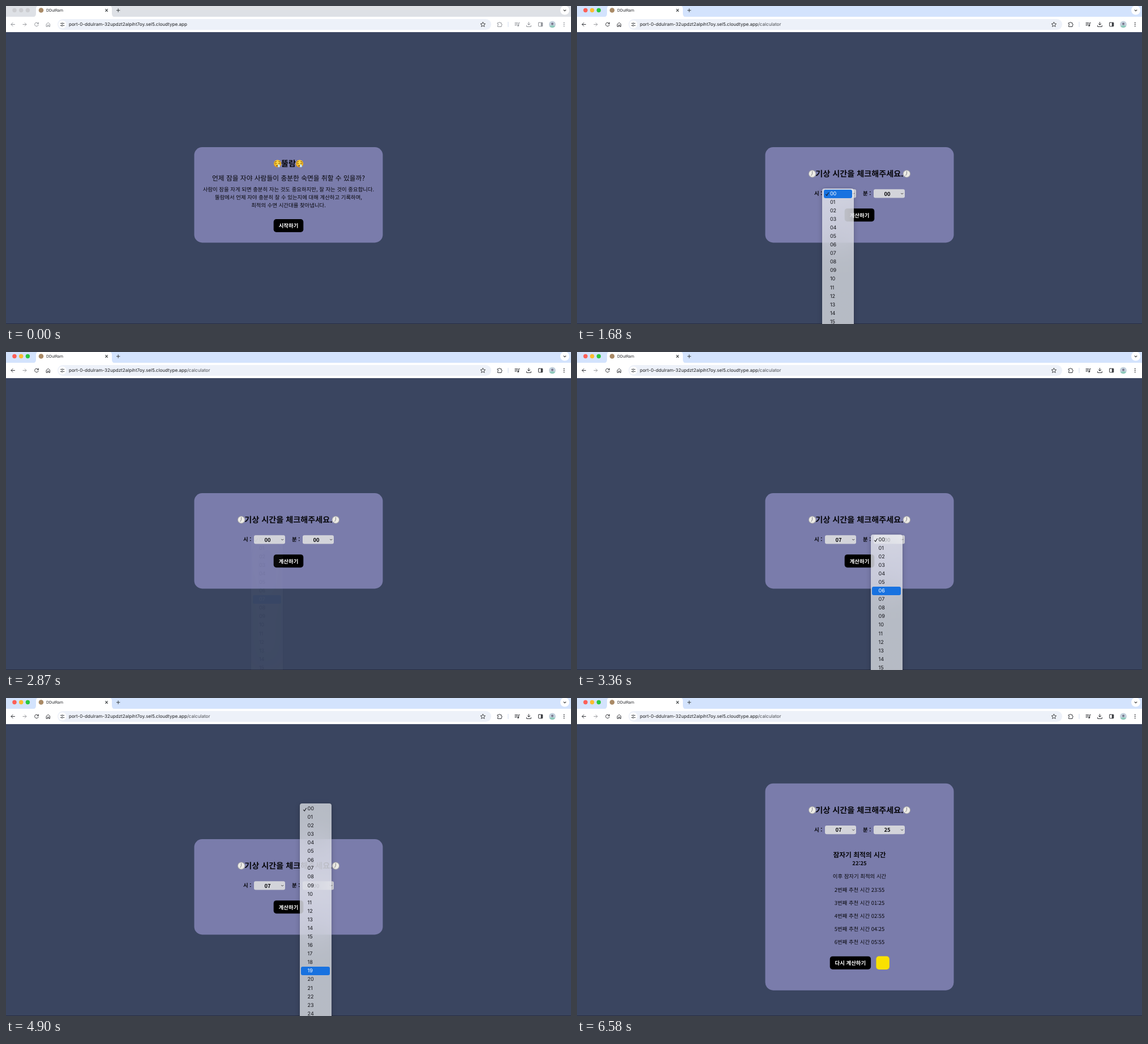
These frames come from a looping animation (998x561 px, 8 s). An HTML page:

```html
<!DOCTYPE html>
<html lang="ko">
<head>
<meta charset="utf-8">
<title>DDulRam</title>
<style>
  html, body { margin: 0; width: 100%; height: 100%; overflow: hidden; background: #3a4560; }
  #stage { position: relative; width: 998px; height: 561px; overflow: hidden; }
  svg { position: absolute; left: 0; top: 0; }
  text {
    font-family: "Noto Sans CJK KR", "Noto Sans KR", "Noto Sans CJK JP", "Noto Sans", sans-serif;
    font-weight: 500; white-space: pre; text-rendering: geometricPrecision;
  }
  text.ui { font-family: Inter, Roboto, sans-serif; font-weight: 400; }
  text.b { font-weight: 700; }
  .ink { stroke: var(--ink); fill: none; stroke-width: 1; stroke-linecap: round; stroke-linejoin: round; }
  .ink .solid { fill: var(--ink); stroke: none; }
  .menu {
    position: absolute; width: 56px; padding: 2.5px 0; box-sizing: border-box; border-radius: 4px;
    background: rgba(248, 249, 249, .66);
    -webkit-backdrop-filter: blur(26px); backdrop-filter: blur(26px);
    box-shadow: 0 2px 8px rgba(0, 0, 0, .22), 0 0 1px rgba(0, 0, 0, .4);
    font: 9.1px Inter, Roboto, sans-serif; color: #16171c; text-rendering: geometricPrecision;
  }
  .menu div { height: 15.05px; line-height: 15.05px; margin: 0 2.8px; padding-left: 11.2px; border-radius: 3px; }
  .menu div.on { background: #1872e0; color: #fff; }
  .menu svg { left: 5px; top: 5.6px; }
</style>
</head>
<body>
<div id="stage">
  <svg width="998" height="561" viewBox="0 0 998 561">
    <defs>
      <radialGradient id="skin" cx=".5" cy=".4" r=".6">
        <stop offset="0" stop-color="#ffe04a"/><stop offset=".65" stop-color="#f9c02c"/><stop offset="1" stop-color="#d98c18"/>
      </radialGradient>
      <g id="sleepy">
        <circle r="6.6" fill="url(#skin)"/>
        <g fill="none" stroke="#5e3a0c" stroke-width=".9" stroke-linecap="round">
          <path d="M-4.700 -.3q1.500 1.500 3.100 .2M1.600 -.1q1.500 1.300 3.100 -.2M-4.500 -2.700l2.300-.9M4.500 -2.700l-2.300-.9"/>
        </g>
        <ellipse cx="-.8" cy="3.700" rx="1.500" ry="1" fill="#6b4410"/>
        <path d="M2.200 .8c1.600 1.900 2.200 2.700 2.200 3.600a2.100 2.100 0 0 1-4.200 0c0-.9.8-2 2-3.600z" fill="#bfe2f7"/>
      </g>
      <g id="clock">
        <circle r="6.700" fill="#a4a4a8"/><circle r="5.700" fill="#ecebe6"/>
        <path d="M0-4.200V0L-1.800 3" fill="none" stroke="#6c6c70" stroke-width=".8" stroke-linecap="round"/>
      </g>
      <g id="dots"><circle cx="15" cy="7.500" r="3.700"/><circle cx="26.700" cy="7.500" r="3.700"/><circle cx="38.400" cy="7.500" r="3.700"/></g>
    </defs>

    <rect width="998" height="20" fill="var(--strip)"/>
    <path d="M47 19.500q6 0 6-6V5q0-5.500 5.500-5.500h123q5.500 0 5.500 5.500v8.500q0 6 6 6z" fill="#fff"/>
    <rect y="19" width="998" height="27.300" fill="#fff"/>
    <use href="#dots" fill="#cccdd1"/>
    <g id="lights">
      <circle cx="15" cy="7.500" r="3.700" fill="#fe5f57"/><circle cx="26.700" cy="7.500" r="3.700" fill="#febc2e"/><circle cx="38.400" cy="7.500" r="3.700" fill="#28c840"/>
    </g>
    <circle cx="62" cy="7.500" r="4.300" fill="#a98a66"/>
    <g stroke="#3c4043" fill="none" stroke-linecap="round">
      <path d="M175.700 5.700l3.800 3.800m0-3.800l-3.800 3.800" stroke-width="1.100"/>
      <path d="M198.200 4.900v5.600m-2.800-2.800h5.600"/>
    </g>
    <circle cx="987" cy="7.500" r="8" fill="#fff"/>
    <path d="M984.800 6.600l2.200 2.200 2.200-2.200" fill="none" stroke="#333" stroke-width="1.100"/>
    <rect x="91" y="23" width="766" height="19" rx="9.500" fill="#edf1f9"/>
    <circle cx="99.500" cy="32.500" r="7" fill="#fff"/>
    <g fill="none" stroke="#3c4043" stroke-width=".9">
      <path d="M96 30.700h2.400M100.800 34.500h2.600M96 34.500h2M101 30.700h2.200"/>
      <circle cx="99.500" cy="30.700" r="1.100" fill="#fff"/><circle cx="99.200" cy="34.500" r="1.100" fill="#fff"/>
    </g>
    <path d="M842.400 28.300l1.300 2.800 3 .3-2.300 2 .7 3-2.700-1.600-2.700 1.600.7-3-2.300-2 3-.3z" fill="none" stroke="#333" stroke-width=".9"/>
    <path d="M29.500 32.500h6.500m-3-3l3 3-3 3" fill="none" stroke="#9b9da1" stroke-width="1"/>
    <g class="ink">
      <path d="M15.500 32.500H9m3-3l-3 3 3 3"/>
      <path d="M57 31a3.300 3.300 0 1 0 .2 2.400M57.300 29v2.300H55"/>
      <path d="M71.500 31.800l3-2.500 3 2.500v4.500h-2v-2.600h-2v2.600h-2z"/>
      <path d="M868.500 29.800h2a1.200 1.200 0 0 1 2.400 0h2.100v2a1.200 1.200 0 0 1 0 2.400v2.300h-6.500v-2.300a1.200 1.200 0 0 0 0-2.400z"/>
      <path d="M899 29.700h5M899 31.900h5M899 34.100h2.800M905.700 34.500v-4.800h1.600"/>
      <circle class="solid" cx="904.600" cy="34.700" r="1.400"/>
      <path d="M923.500 28.500v5m-2.200-2.200l2.200 2.200 2.200-2.200M919.700 34.300v2.200h7.600v-2.200"/>
      <rect x="940.500" y="29.200" width="7.300" height="6.700" rx=".8"/>
      <rect class="solid" x="944.800" y="29.200" width="3" height="6.700"/>
      <circle class="solid" cx="985.700" cy="29.400" r=".9"/><circle class="solid" cx="985.700" cy="32.500" r=".9"/><circle class="solid" cx="985.700" cy="35.600" r=".9"/>
    </g>
    <path d="M887 28v9" stroke="#d0dbee"/>
    <circle cx="965" cy="32.500" r="5.900" fill="#c3d0dc"/>
    <path d="M960 35.500q5-3 10 0a5.900 5.900 0 0 1-10 0z" fill="#8fcabb"/>
    <circle cx="965" cy="31.500" r="2" fill="#77748a"/>
    <g id="bar"></g>

    <rect y="46.300" width="998" height="515" fill="#3a4560"/>
    <rect y="560" width="998" height="1" fill="#282e42"/>
    <rect id="card" x="332.500" width="333" rx="14.100" fill="#7a7cab"/>
    <g id="intro"></g>
    <g id="form"></g>
    <g id="ask"></g>
    <g id="result"></g>
  </svg>
</div>
<script>
const $ = id => document.getElementById(id);
const MID = 499, ROW = 15.05, S = 9.42, M = 11.78, L = 14.13;

// y is the visual middle of the line
const text = (x, y, size, str, { cls = '', fill = '#07070b', anchor = 'middle', id = '' } = {}) =>
  `<text x="${x}" y="${y + size * .37}" font-size="${size}" class="${cls}" fill="${fill}" text-anchor="${anchor}" id="${id}">${str}</text>`;
const bold = (x, y, size, str, opt) => text(x, y, size, str, { cls: 'b', ...opt });
const use = (name, x, y) => `<use href="#${name}" x="${x}" y="${y}"/>`;
const button = (x, y, w, label) =>
  `<rect class="btn" x="${x}" y="${y}" width="${w}" height="23" rx="4.700"/>` + bold(x + w / 2, y + 11.9, S, label, { fill: '#fff' });
const select = (x, id) =>
  `<rect x="${x}" y="323.200" width="55" height="15.300" rx="3" fill="#d3d4da"/>` +
  bold(x + 24, 331.2, S, '00', { id }) +
  `<path d="M${x + 48.2} 330l2 2 2-2" fill="none" stroke="#333" stroke-width=".9"/>`;

$('bar').innerHTML =
  text(71, 7.6, 6.9, 'DDulRam', { cls: 'ui', anchor: 'start', fill: '#24262a' }) +
  text(111, 32.4, 8.1, 'port-0-ddulram-32updzt2alpiht7oy.sel5.cloudtype.app<tspan id="path" fill="#484b50">/calculator</tspan>',
    { cls: 'ui', anchor: 'start', fill: '#1f2023' });

$('intro').innerHTML =
  use('sleepy', 479.6, 278) + use('sleepy', 518.6, 278) + bold(MID, 277.5, L, '뚤람') +
  text(MID, 303.5, M, '언제 잠을 자야 사람들이 충분한 숙면을 취할 수 있을까?') +
  ['사람이 잠을 자게 되면 충분히 자는 것도 중요하지만, 잘 자는 것이 중요합니다.',
   '뚤람에서 언제 자야 충분히 잘 수 있는지에 대해 계산하고 기록하며,',
   '최적의 수면 시간대를 찾아냅니다.'].map((s, i) => text(MID, 323.5 + i * 13.9, S, s)).join('') +
  button(472.7, 376, 52.6, '시작하기');

$('form').innerHTML =
  use('clock', 415.6, 296) + use('clock', 582.4, 296) + bold(MID, 296.2, L, '기상 시간을 체크해주세요.') +
  bold(419, 331, S, '시 :', { anchor: 'start' }) + select(438, 'hh') +
  bold(505, 331, S, '분 :', { anchor: 'start' }) + select(524, 'mm');

$('ask').innerHTML = button(472.7, 357.2, 52.6, '계산하기');

$('result').innerHTML =
  bold(MID, 276.7, M, '잠자기 최적의 시간') + bold(MID, 292, S, '22:25') +
  text(MID, 315, S, '이후 잠자기 최적의 시간') +
  ['23:55', '01:25', '02:55', '04:25', '05:55']
    .map((s, i) => text(MID, 338.1 + i * 23.1, S, `${i + 2}번째 추천 시간 ${s}`)).join('') +
  button(446.7, 455.7, 72.4, '다시 계산하기') +
  '<rect x="528.400" y="455.500" width="23.400" height="23.500" rx="5" fill="#fae100"/>';

function makeMenu(left, count) {
  const el = document.createElement('div');
  el.className = 'menu';
  el.style.left = left + 'px';
  el.innerHTML = '<svg width="8" height="9"><path d="M1.200 5l2 2.300L6.600 2" fill="none" stroke="#16171c" stroke-width="1.100"/></svg>' +
    Array.from({ length: count }, (_, i) => `<div>${String(i).padStart(2, '0')}</div>`).join('');
  $('stage').append(el);
  return { el, rows: [...el.querySelectorAll('div')] };
}
const hours = makeMenu(432.9, 24), minutes = makeMenu(518.6, 60);

// time, rows scrolled, highlighted row, opacity
const hourSteps = [
  [0, 0, 0, 0], [1680, 0, 0, 1], [1820, 0, 2, 1], [1890, 0, 4, 1], [1960, 0, -1, 1], [2240, 0, 8, 1], [2310, 0, 7, 1],
  [2660, 0, 7, .7], [2730, 0, 7, .4], [2800, 0, 7, .15], [2870, 0, 7, .04], [2940, 0, 7, .02], [3010, 0, 7, 0]];
const minuteSteps = [
  [0, 0, 0, 0], [3220, 0, 0, 1], [3290, 0, 3, 1], [3360, 0, 6, 1], [3430, 0, 9, 1], [3780, 0, 10, 1],
  [4130, 2, 12, 1], [4200, 3, 13, 1], [4270, 4, 14, 1], [4340, 5, 14, 1], [4410, 5, 15, 1], [4480, 6, 16, 1],
  [4620, 7, 16, 1], [4690, 7, 17, 1], [4830, 8, 18, 1], [4900, 9, 19, 1], [5110, 10, 20, 1],
  [5250, 10, 23, 1], [5320, 10, 25, 1], [5950, 10, 25, .39], [6020, 10, 25, .18], [6090, 10, 25, .05], [6160, 10, 25, 0]];

function drawMenu({ el, rows }, steps, t) {
  const [, scroll, on, opacity] = steps.findLast(s => s[0] <= t);
  el.style.display = opacity ? 'block' : 'none';
  el.style.opacity = opacity;
  el.style.top = 321.5 - scroll * ROW + 'px';
  rows.forEach((row, i) => row.classList.toggle('on', i === on));
}

const show = (id, on) => $(id).style.display = on ? '' : 'none';
const between = (t, a, b) => t >= a && t < b;
const mix = (a, b, k) => `rgb(${a.map((v, i) => Math.round(v + (b[i] - v) * k))})`;

function draw(t) {
  const focus = t >= 350 ? 1 : 1 - .4 ** Math.floor(t / 70);
  const calc = t >= 910, done = t >= 6510;
  const root = document.documentElement.style;
  root.setProperty('--strip', mix([222, 225, 230], [211, 227, 253], focus));
  root.setProperty('--ink', mix([146, 149, 154], [55, 57, 61], focus));
  $('lights').style.opacity = focus;

  show('path', calc);
  show('intro', !calc);
  show('form', calc);
  show('ask', calc && !done);
  show('result', done);
  $('card').setAttribute('y', done ? 150.8 : 249);
  $('card').setAttribute('height', done ? 364.9 : 168.5);
  $('form').setAttribute('transform', `translate(0 ${done ? -98.3 : 0})`);
  $('hh').textContent = t >= 3150 ? '07' : '00';
  $('mm').textContent = t >= 6370 ? '25' : '00';

  const hover = between(t, 560, 910) || between(t, 1260, 1400) || between(t, 6370, 6510);
  document.querySelectorAll('.btn').forEach(b => b.setAttribute('fill', hover ? '#333' : '#000'));

  drawMenu(hours, hourSteps, t);
  drawMenu(minutes, minuteSteps, t);
}

const start = performance.now();
function loop() {
  draw((performance.now() - start) % 8000);
  requestAnimationFrame(loop);
}
loop();
</script>
</body>
</html>
```
